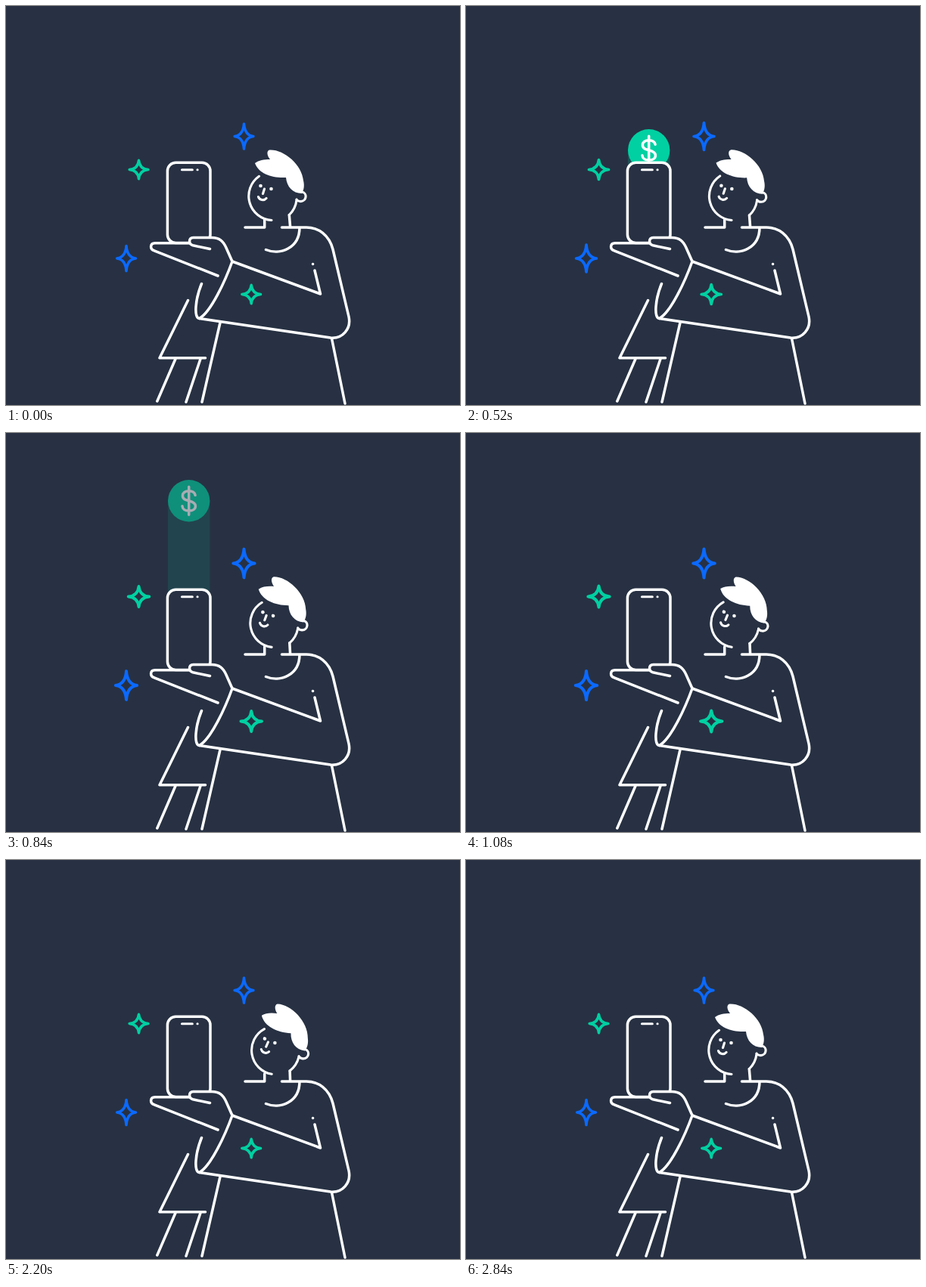
An HTML page that plays this animation: 600 by 528 pixels, repeating every 2880 ms.

```html
<!DOCTYPE html>
<html lang="en">
<head>
<meta charset="utf-8">
<title>Phone and coin</title>
<style>
  html, body { margin: 0; width: 100%; height: 100%; overflow: hidden; background: #273143; }
  svg { display: block; width: 100vw; height: 100vh; }
  .line { fill: none; stroke: #fff; stroke-width: 3.5; stroke-linecap: round; stroke-linejoin: round; }
  .thin { stroke-width: 3.1; }
  .solid { fill: #273143; }
  .blue { stroke: #0b69ff; }
  .green { stroke: #00d0a2; }
</style>
</head>
<body>
<svg viewBox="0 0 600 528">
  <g id="coin">
    <rect id="trail" x="214" width="55.4" fill="#00d0a2" opacity=".2"/>
    <g id="disc">
      <circle r="27.7" fill="#00d0a2"/>
      <path class="line" d="M0-18.5V18.5M8.4-7.5C7.5-11.5 4-13 0-13C-5-13-8.3-10.5-8.3-6.7C-8.3-2-4-1 0 0C4 1 8.7 2.5 8.7 7C8.7 11 5 13.3 0 13.3C-5 13.3-8.5 11-8.7 7"/>
    </g>
  </g>

  <!-- phone -->
  <rect class="line solid" x="213.4" y="207.2" width="56.6" height="106.3" rx="11"/>
  <path class="line thin" d="M232.5 216.7H246.3M253 216.7h.1"/>

  <!-- hand and arm -->
  <path class="line" d="M246 313.8H197C190 314 190 322 196 323.8L280 357"/>
  <path class="line solid" d="M269.5 321.5L247 316.8C241 315 241 306.8 247.5 306.5H272C282 306.5 287 311 291 320L299 338"/>
  <path class="line" d="M408 350L415.5 381L299 338C290 363 271 405 255.5 413.5C248 413 250 388 258.5 367.5M405.5 341.4h.1"/>

  <!-- body -->
  <path class="line" d="M255.5 413.5L429 439C445 440.5 456.500 427 453 411L432 322C427 303 413 293 397 293H364.500M388 293C388 321 362 330 343.500 322.500"/>
  <path class="line" d="M283 419L259 524M430.500 440L448 526M316 293H341.700V283"/>
  <path class="line" d="M240.500 389.500L203 465.700H263.500M224 467L199.800 523M257 467L238 524"/>

  <line class="line" id="neck" x2="375.600" y2="292"/>
  <g id="head">
    <path class="line thin" d="M334.500 225.300A32 32 0 0 0 351 283.500M384 257C383 265 380 271 374.300 276.500"/>
    <path class="line thin" d="M391 246C398 247 398 258 389.500 258.600C387 258.600 385 257.500 384 256"/>
    <path fill="#fff" d="M329 208C334 204 341 203 349 203C345 198 344 192 348 190.500C366 189 391 209 393 231C394.500 237 394 243 391 248C379 248 371 239 370 227C352 228 334 222 329 208Z"/>
    <path class="line thin" d="M341.500 242L339.500 248.500M333.500 252.500C335 257 341 258 344 254.500"/>
    <g fill="#fff"><circle cx="336.500" cy="238" r="2.300"/><circle cx="350.500" cy="242" r="2.300"/></g>
  </g>
  <g id="sparkles"></g>
</svg>
<script>
const LOOP = 2880;
const PIVOT = { x: 353, y: 285 };
const JAW = { x: 374.3, y: 276.5 };
const TILT = 6.6;
const byId = id => document.getElementById(id);
const clamp = v => Math.min(1, Math.max(0, v));
const progress = (t, start, end) => clamp((t - start) / (end - start));
const smooth = u => u * u * (3 - 2 * u);
const ramp = (t, start, end) => smooth(progress(t, start, end));

// Steeper in-out curve for the nod
const nodEase = u => u < 0.5 ? 0.5 * (2 * u) ** 2.4 : 1 - 0.5 * (2 - 2 * u) ** 2.4;

const starPath = (w, h) => {
  const a = 0.065 * w, b = 0.4 * w, c = 0.35 * h, d = 0.05 * h;
  return `M0 ${-h}C${a} ${-c} ${b} ${-d} ${w} 0C${b} ${d} ${a} ${c} 0 ${h}` +
    `C${-a} ${c} ${-b} ${d} ${-w} 0C${-b} ${-d} ${-a} ${-c} 0 ${-h}Z`;
};

const sparkles = [
  { x: 314.5, y: 172.5, color: 'blue', h: 16.6, peak: 1020, end: 2080 },
  { x: 159, y: 334, color: 'blue', h: 16.6, peak: 1020, end: 2080 },
  { x: 175.5, y: 216.5, color: 'green', h: 12.3, peak: 1260, end: 2280 },
  { x: 324.2, y: 381.5, color: 'green', h: 12.3, peak: 1260, end: 2280 }
];
for (const s of sparkles) {
  s.node = document.createElementNS('http://www.w3.org/2000/svg', 'path');
  s.node.setAttribute('class', `line ${s.color}`);
  s.node.setAttribute('d', starPath(12.4, s.h));
  byId('sparkles').append(s.node);
}

function set(id, attributes) {
  for (const [name, value] of Object.entries(attributes)) byId(id).setAttribute(name, value);
}

function draw(t) {
  const coinY = 260 - 184 * ramp(t, 200, 970);
  set('coin', { opacity: 1 - progress(t, 760, 960) });
  set('disc', { transform: `translate(241.7 ${coinY})` });
  set('trail', { y: coinY, height: Math.max(0, 290 - coinY) });

  const nod = nodEase(progress(t, 0, 1640)) - nodEase(progress(t, 2120, 2860));
  const angle = TILT * nod;
  set('head', { transform: `rotate(${angle} ${PIVOT.x} ${PIVOT.y})` });
  const rad = angle * Math.PI / 180, dx = JAW.x - PIVOT.x, dy = JAW.y - PIVOT.y;
  set('neck', {
    x1: PIVOT.x + dx * Math.cos(rad) - dy * Math.sin(rad),
    y1: PIVOT.y + dx * Math.sin(rad) + dy * Math.cos(rad)
  });

  for (const s of sparkles) {
    const scale = 1 + 0.15 * (ramp(t, 0, s.peak) - ramp(t, s.peak, s.end));
    s.node.setAttribute('transform', `translate(${s.x} ${s.y}) scale(${scale})`);
  }
}

const began = performance.now();
function tick() {
  draw((performance.now() - began) % LOOP);
  requestAnimationFrame(tick);
}
tick();
</script>
</body>
</html>
```
